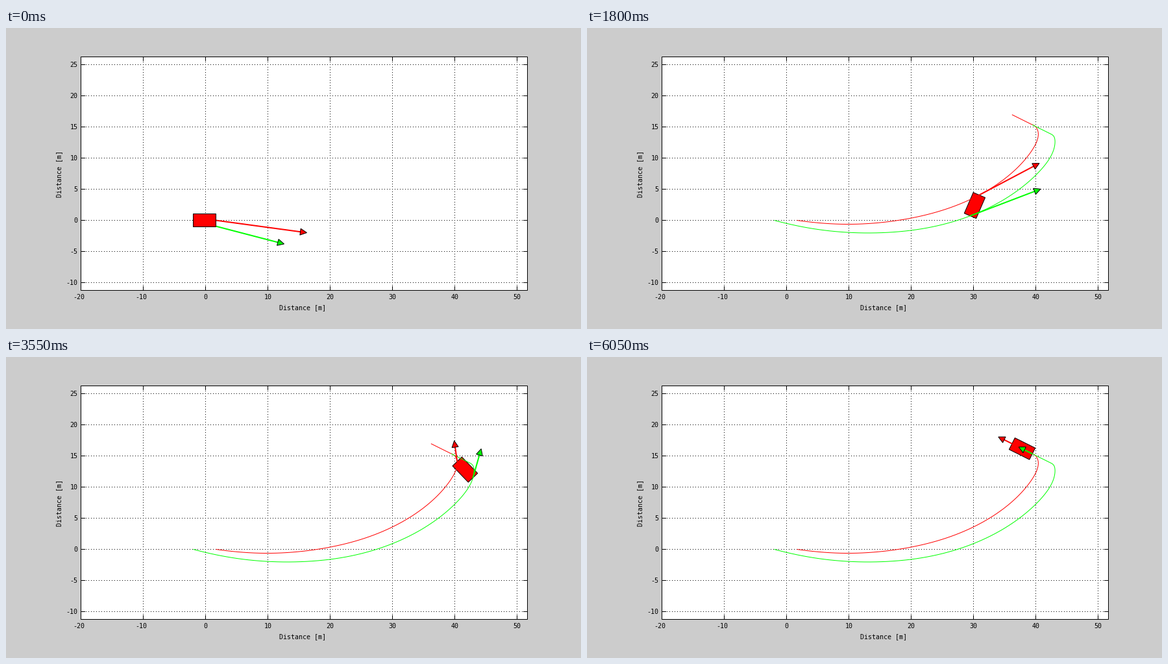
Animation, 886 px wide and 464 px high, one loop 6100 ms. Source, as a matplotlib script:

```python
import numpy as np
import matplotlib.pyplot as plt
from matplotlib.animation import FuncAnimation
from matplotlib.patches import Polygon, Rectangle

W, H, DPI = 886, 464, 72
FRAMES, STEP = 122, 50
LEFT, RIGHT, TOP, BOTTOM = 115.5, 803.5, 44.5, 404.5
SCALE, X0, Y0 = 9.6, 307.5, 296.5
LENGTH, HALF = 35, 10
RED, GREEN = "#ff0000", "#00ff00"

# The slide: frame, nose x, nose y, heading; then a straight roll to the end
KEYS = np.array([
    (0, 323.5, 296.5, 0),
    (11, 416, 302.3, 19),
    (26, 539, 283.6, 48),
    (46, 652, 225.6, 85),
    (59, 687.7, 185.4, 110),
    (71, 695.2, 161, 134),
    (78, 691.5, 152.5, 147),
    (88, 683.4, 147.8, 153.5),
])
START_RATE = np.array([8.8, 1.25, 1.8])
END_RATE = np.array([-0.864, -0.43, 0])


def spline(t, keys, first, last):
    """Cubic spline through the keys with given end slopes, straight afterwards."""
    kt, kv = keys[:, 0], keys[:, 1:]
    h = np.diff(kt)
    d = np.diff(kv, axis=0) / h[:, None]
    a, b = np.eye(len(kt)), np.zeros_like(kv)
    b[0], b[-1] = first, last
    for i in range(1, len(kt) - 1):
        p, q = 1 / h[i - 1], 1 / h[i]
        a[i, i - 1:i + 2] = p, 2 * (p + q), q
        b[i] = 3 * (d[i - 1] * p + d[i] * q)
    m = np.linalg.solve(a, b)

    s = np.minimum(t, kt[-1])
    i = np.clip(np.searchsorted(kt, s, side="right") - 1, 0, len(h) - 1)
    g = h[i][:, None]
    u = (s - kt[i])[:, None] / g
    curve = (kv[i] + (kv[i + 1] - kv[i]) * u**2 * (3 - 2 * u)
             + g * u * (1 - u) * (m[i] * (1 - u) - m[i + 1] * u))
    return curve + (t - s)[:, None] * last


def arrow_vectors(path):
    """Velocity arrows: scaled speed plus the length of the head."""
    v = np.gradient(path, axis=0)
    speed = np.hypot(*v.T)[:, None]
    return v / speed * (15 * speed + 9)


track = spline(np.arange(FRAMES), KEYS, START_RATE, END_RATE)
angle = np.radians(track[:, 2])
forward = np.column_stack([np.cos(angle), -np.sin(angle)])
front = track[:, :2]
rear = front - LENGTH * forward
front_vec, rear_vec = arrow_vectors(front), arrow_vectors(rear)

plt.rcParams.update({"font.family": "DejaVu Sans Mono", "font.size": 10})
fig = plt.figure(figsize=(W / DPI, H / DPI), dpi=DPI, facecolor="#cccccc")
ax = fig.add_axes([0, 0, 1, 1])
ax.set(xlim=(0, W), ylim=(H, 0))
ax.axis("off")


def line(xs, ys, color="black", width=1, z=1, **kw):
    return ax.plot(xs, ys, color=color, lw=width, zorder=z, snap=False,
                   solid_capstyle="butt", dash_capstyle="butt", **kw)[0]


def shape(color, z):
    return ax.add_patch(Polygon(np.zeros((3, 2)), fc=color, ec="black",
                                lw=1, snap=False, zorder=z))


def label(x, y, text, ha="center", **kw):
    ax.text(x, y, text, ha=ha, va="baseline", **kw)


def draw_axes():
    ax.add_patch(Rectangle((LEFT, TOP), RIGHT - LEFT, BOTTOM - TOP,
                           fc="white", ec="black", lw=1, snap=False, zorder=0))
    dots = (0, (1, 3))
    for v in range(-20, 51, 10):
        x = X0 + SCALE * v
        if v > -20:
            line([x, x], [BOTTOM + 0.5, TOP], ls=dots)
        line([x, x], [BOTTOM, BOTTOM - 6.5])
        line([x, x], [TOP, TOP + 6.5])
        label(x - (3.5 if v < 0 else 0), 418.5, str(v))
    for v in range(-10, 26, 5):
        y = Y0 - SCALE * v
        line([LEFT - 0.5, RIGHT], [y, y], ls=dots)
        line([LEFT, LEFT + 6.5], [y, y])
        line([RIGHT, RIGHT - 6.5], [y, y])
        label(110.5, y + 4, str(v), ha="right")
    label(457.5, 434.5, "Distance [m]")
    label(85, 225, "Distance [m]", rotation=90, rotation_mode="anchor")


class Arrow:
    def __init__(self, color):
        self.shaft = line([], [], color, 2, 6)
        self.head = shape(color, 7)

    def set(self, start, vec):
        tip = start + vec
        unit = vec / np.hypot(*vec)
        side = 5 * np.array([-unit[1], unit[0]])
        base = tip - 10 * unit
        self.shaft.set_data(*np.column_stack([start, base]))
        self.head.set_xy([tip, base + side, base - side])


draw_axes()
trails = [line(*front.T, RED, z=4), line(*rear.T, GREEN, z=5)]
car = shape(RED, 3)
red_arrow, green_arrow = Arrow(RED), Arrow(GREEN)


def draw(i):
    side = HALF * np.array([-forward[i, 1], forward[i, 0]])
    car.set_xy([front[i] + side, front[i] - side, rear[i] - side, rear[i] + side])
    # the opening pose has no trails and the car lies on top
    car.set_zorder(3 if i else 8)
    for trail in trails:
        trail.set_visible(i > 0)
    red_arrow.set(front[i], front_vec[i])
    green_arrow.set(rear[i], rear_vec[i])
    return [car, *trails]


anim = FuncAnimation(fig, draw, frames=FRAMES, interval=STEP, repeat=True,
                     repeat_delay=0, blit=False)
plt.show()
```
